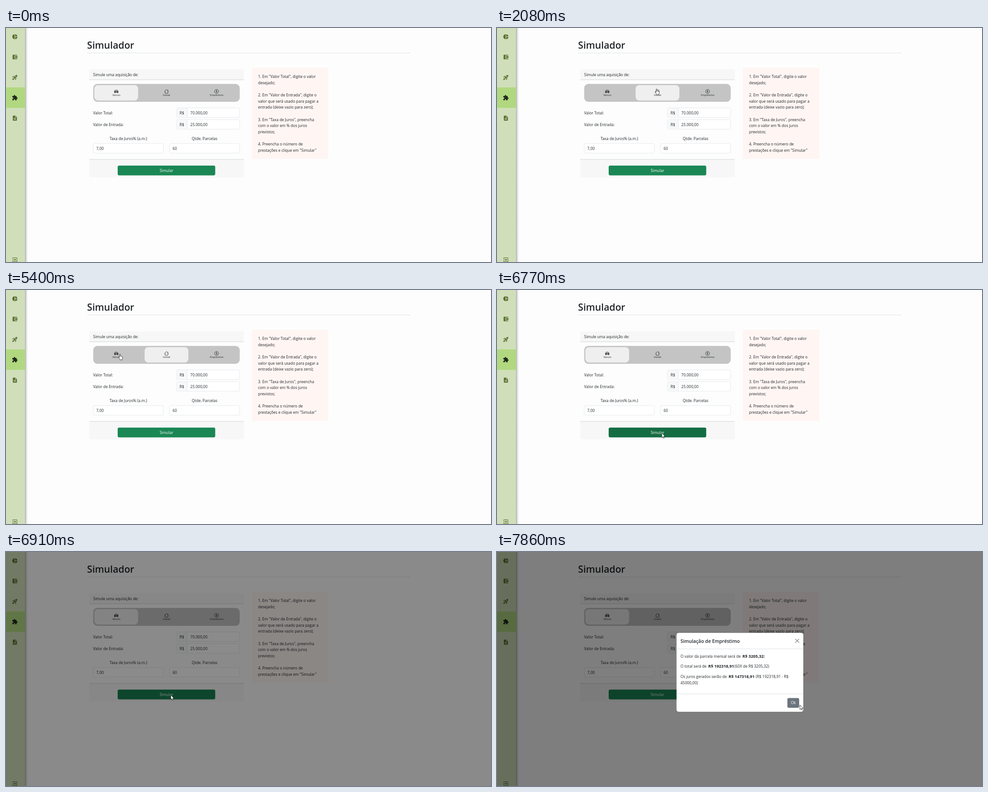
An HTML page that plays this animation: 1077x520 px, repeating every 7.99 s.

```html
<!DOCTYPE html>
<html lang="pt-BR">
<head>
<meta charset="utf-8">
<title>Simulador</title>
<style>
html, body { margin: 0; width: 100%; height: 100%; overflow: hidden; background: #fdfdfd; }
svg { display: block; }
text { font: 8.47px "Open Sans", "Noto Sans", sans-serif; fill: #212529; white-space: pre; }
.mid { text-anchor: middle; }
.small { font-size: 5.3px; }
.title { font-size: 21.2px; font-weight: 600; }
.head { font-size: 10.5px; font-weight: 600; }
.b { font-size: 9.07px; font-weight: 700; }
.light { fill: #fff; }
.line { stroke: #dee2e6; }
.field { fill: #fff; stroke: #dee2e6; stroke-width: .8; }
.menu { fill: #587031; }
.ico { fill: none; stroke: #212529; stroke-width: .8; stroke-linejoin: round; }
.cur { fill: #fff; stroke: #111; stroke-width: .8; stroke-linejoin: round; }
</style>
</head>
<body>
<svg width="1077" height="520" viewBox="0 0 1077 520">
  <defs>
    <linearGradient id="shade">
      <stop offset="0" stop-opacity=".36"/>
      <stop offset=".5" stop-opacity=".1"/>
      <stop offset="1" stop-opacity="0"/>
    </linearGradient>
  </defs>

  <!-- sidebar -->
  <rect x="42" width="7" height="520" fill="url(#shade)"/>
  <rect width="42.5" height="520" fill="#d0dfba"/>
  <rect y="132" width="42.5" height="45.5" fill="#b1d880"/>
  <g id="menu" class="menu"></g>

  <text class="title" x="180" y="46">Simulador</text>
  <path class="line" d="M180 55.5H898"/>

  <!-- form card -->
  <path fill="#f7f7f7" d="M185 92h343v23H185zM185 292h343v40H185z"/>
  <path d="M185 115h343M185 292h343" stroke="#d2d3d4"/>
  <text x="193.5" y="107">Simule uma aquisição de:</text>
  <rect x="193.7" y="124.3" width="325.3" height="39.7" rx="9" fill="#c4c4c4"/>
  <g id="pills" fill="#efefef"></g>
  <path transform="translate(240.2 136.4) scale(.58)" fill="#212529" fill-rule="evenodd" d="M2.52 3.515A2.5 2.5 0 0 1 4.82 2h6.362c1 0 1.904.596 2.298 1.515l.792 1.848c.075.175.21.319.38.404.5.25.855.715.965 1.262l.335 1.679c.033.161.049.325.049.49v.413c0 .814-.39 1.543-1 1.997V13.5a.5.5 0 0 1-.5.5h-2a.5.5 0 0 1-.5-.5v-1.338c-1.292.048-2.745.088-4 .088s-2.708-.04-4-.088V13.5a.5.5 0 0 1-.5.5h-2a.5.5 0 0 1-.5-.5v-1.892c-.61-.454-1-1.183-1-1.997v-.413a2.5 2.5 0 0 1 .049-.49l.335-1.68c.11-.546.465-1.012.964-1.261a.807.807 0 0 0 .381-.404zM3 10a1 1 0 1 0 0-2 1 1 0 0 0 0 2m10 0a1 1 0 1 0 0-2 1 1 0 0 0 0 2M6 8a1 1 0 0 0 0 2h4a1 1 0 1 0 0-2zM2.906 5.189a.51.51 0 0 0 .497.731c.91-.073 3.35-.17 4.597-.17s3.688.097 4.597.17a.51.51 0 0 0 .497-.731l-.956-1.913A.5.5 0 0 0 11.691 3H4.309a.5.5 0 0 0-.447.276z"/>
  <path class="ico" d="M351.8 141.2l4.6-4.5 4.6 4.5M353.2 140v5h6.4v-5M359.2 139.2v-2"/>
  <circle class="ico" cx="467.6" cy="141" r="4.4"/>
  <text class="mid" x="467.6" y="143.4" style="font-size:6.4px;font-weight:600">$</text>
  <text class="mid small" x="245" y="151.4">Veículo</text>
  <text class="mid small" x="356.4" y="151.4">Imóvel</text>
  <text class="mid small" x="467.8" y="151.4">Empréstimo</text>

  <text x="193.5" y="191.5">Valor Total:</text>
  <text x="193.5" y="217.6">Valor de Entrada:</text>
  <g id="money">
    <rect class="field" x="378.3" y="177.6" width="140.5" height="21.2" rx="3.2"/>
    <path d="M402.5 178H381.5a2.8 2.8 0 0 0-2.8 2.8v14.8a2.8 2.8 0 0 0 2.8 2.8h21z" fill="#f7f8f9"/>
    <path class="line" stroke-width=".8" d="M402.5 178v20.5"/>
    <text x="385.5" y="191.5">R$</text>
  </g>
  <use href="#money" y="26.1"/>
  <text x="409.3" y="191.5">70.000,00</text>
  <text x="409.3" y="217.6">25.000,00</text>
  <text class="mid" x="271.6" y="248.6">Taxa de Juros% (a.m.)</text>
  <text class="mid" x="441" y="248.6">Qtde. Parcelas</text>
  <rect class="field" x="193.8" y="256.9" width="155.6" height="21.2" rx="3.2"/>
  <rect class="field" x="363.2" y="256.9" width="155.6" height="21.2" rx="3.2"/>
  <text x="200.5" y="270.8">7,00</text>
  <text x="370" y="270.8">60</text>
  <rect id="send" x="248" y="305.8" width="216.6" height="21.6" rx="3.4"/>
  <text class="mid light" x="356.3" y="319.8">Simular</text>

  <!-- help box -->
  <rect x="546" y="88" width="170" height="202.7" fill="#fff6f4"/>
  <g id="help"></g>

  <!-- dialog -->
  <rect id="dim" width="1077" height="520"/>
  <g id="modal">
    <rect x="398.7" y="179.7" width="281.4" height="175.2" rx="4.5" fill="#fff"/>
    <path class="line" d="M399 215.3H680M399 315.3H680"/>
    <text class="head" x="407.5" y="201.8">Simulação de Empréstimo</text>
    <path d="M662.5 193.3l8 8m0-8l-8 8" stroke="#777" stroke-width="1.2" stroke-linecap="round"/>
    <text x="407.5" y="234.6">O valor da parcela mensal será de <tspan class="b" x="545">R$ 3205,32:</tspan></text>
    <text x="407.5" y="257.3">O total será de <tspan class="b" x="469">R$ 192318,91</tspan><tspan x="527">(60X de R$ 3205,32)</tspan></text>
    <text x="407.5" y="279.9">Os juros gerados serão de <tspan class="b" x="514.3">R$ 147318,91</tspan><tspan x="574.5">(R$ 192318,91 - R$</tspan></text>
    <text x="407.5" y="293.5">45000,00)</text>
    <rect x="644.8" y="324.4" width="26.2" height="21.8" rx="3.4" fill="#6c757d"/>
    <text class="mid light" x="657.9" y="338.4">Ok</text>
  </g>

  <g id="cursor" class="cur">
    <path id="arrow" d="M0 0v10l2.3-2.1 1.6 3.5 1.7-.8-1.6-3.4h3.2z"/>
    <path id="hand" d="M3 8V1.4a1 1 0 0 1 2 0V5q1-.8 1.7.3 1-.5 1.5.5 1.3-.3 1.5 1v2.4q0 1.6-.9 2.6v1.4H4.2v-1L.9 8.2q-.7-1.1.5-1.4.8 0 1.6 1.2z"/>
  </g>
</svg>
<script>
const LOOP = 7990, PILL_FADE = 180;
const $ = id => document.getElementById(id);
const add = (parent, tag, attrs, text = "") => {
  const el = document.createElementNS("http://www.w3.org/2000/svg", tag);
  for (const k in attrs) el.setAttribute(k, attrs[k]);
  el.textContent = text;
  return $(parent).appendChild(el);
};
const ramp = (t, start, length) => Math.min(1, Math.max(0, (t - start) / length));
const mix = (a, b, k) => a + (b - a) * k;

// [centre y, 24-unit path]
const icons = [
  [19.3, "M11 2v20c-5.07-.5-9-4.79-9-10s3.93-9.5 9-10zm2.03 0v8.99H22c-.47-4.74-4.24-8.52-8.97-8.99zm0 11.01V22c4.74-.47 8.5-4.25 8.97-8.99z"],
  [64.5, "M21 18v1c0 1.1-.9 2-2 2H5c-1.11 0-2-.9-2-2V5c0-1.1.89-2 2-2h14c1.1 0 2 .9 2 2v1h-9c-1.11 0-2 .9-2 2v8c0 1.1.89 2 2 2zm-9-2h10V8H12zm4-2.5c-.83 0-1.5-.67-1.5-1.5s.67-1.5 1.5-1.5 1.5.67 1.5 1.5-.67 1.5-1.5 1.5z"],
  [109.8, "M9.19 6.35c-2.04 2.29-3.44 5.58-3.57 5.89L2 10.69l4.05-4.05c.47-.47 1.15-.68 1.81-.55zM11.17 17s3.74-1.55 5.89-3.7c5.4-5.4 4.5-9.62 4.21-10.57-.95-.3-5.17-1.19-10.57 4.21C8.55 9.09 7 12.83 7 12.83zm6.48-2.19c-2.29 2.04-5.58 3.44-5.89 3.57L13.31 22l4.05-4.05c.47-.47.68-1.15.55-1.81zM9 18c0 .83-.34 1.58-.88 2.12C6.94 21.3 2 22 2 22s.7-4.94 1.88-6.12C4.42 15.34 5.17 15 6 15c1.66 0 3 1.34 3 3zm4-9c0-1.1.9-2 2-2s2 .9 2 2-.9 2-2 2-2-.9-2-2z"],
  [155, "M20.5 11H19V7c0-1.1-.9-2-2-2h-4V3.5C13 2.12 11.88 1 10.5 1S8 2.12 8 3.5V5H4c-1.1 0-2 .9-2 2v3.8h1.5c1.49 0 2.7 1.21 2.7 2.7s-1.21 2.7-2.7 2.7H2V20c0 1.1.9 2 2 2h3.8v-1.5c0-1.49 1.21-2.7 2.7-2.7s2.7 1.21 2.7 2.7V22H17c1.1 0 2-.9 2-2v-4h1.5c1.38 0 2.5-1.12 2.5-2.5S21.88 11 20.5 11z"],
  [200.3, "M14 2H6c-1.1 0-2 .9-2 2v16c0 1.1.89 2 2 2h12c1.1 0 2-.9 2-2V8zm2 16H8v-2h8zm0-4H8v-2h8zm-3-5V3.5L18.5 9z"],
  [515, "M10.09 15.59L11.5 17l5-5-5-5-1.41 1.41L12.67 11H3v2h9.67zM19 3H5c-1.11 0-2 .9-2 2v4h2V5h14v14H5v-4H3v4c0 1.1.89 2 2 2h14c1.1 0 2-.9 2-2V5c0-1.1-.9-2-2-2z"]
];
icons.forEach(([y, d], i) => {
  const el = add("menu", "path", { d, transform: `translate(12.9 ${y - 6.8}) scale(.567)` });
  if (i === 3) el.setAttribute("fill", "#20281c");
});

const help = `1. Em "Valor Total", digite o valor
desejado;

2. Em "Valor de Entrada", digite o
valor que será usado para pagar a
entrada (deixe vazio para zero);

3. Em "Taxa de Juros", preencha
com o valor em % dos juros
previstos;

4. Preencha o número de
prestações e clique em "Simular"`;
help.split("\n").forEach((s, i) => add("help", "text", { x: 559.7, y: 111.3 + 13.6 * i }, s));

const pills = [0, 1, 2].map(i =>
  add("pills", "rect", { x: 196.2 + 111.6 * i, y: 127, width: 97.2, height: 34.2, rx: 8 }));
// [time, chosen tab]
const picks = [[-999, 0], [1840, 1], [3060, 2], [4340, 1], [5410, 0]];

// pointer path: [time, x, y]
const path = [
  [110, 834, 376], [330, 640, 215], [520, 470, 90], [620, 410, 70], [740, 345, 95],
  [810, 331, 120], [880, 342, 132], [1090, 346, 136], [1960, 346, 136], [2080, 350, 135],
  [2400, 455, 143], [2540, 480, 146], [2620, 475, 144], [2760, 467, 141], [2890, 467, 141],
  [2960, 463, 138], [3440, 463, 138], [3710, 419, 137], [3990, 360, 137], [4500, 360, 137],
  [5000, 249, 136], [5130, 249, 136], [5200, 245, 135], [5330, 245, 135], [5400, 249, 142],
  [5560, 249, 142], [5800, 275, 200], [6160, 341, 286], [6430, 366, 318], [6940, 366, 318],
  [7200, 640, 300], [7390, 805, 265], [7860, 672.7, 340], [LOOP, 672.7, 340]
];

function drawCursor(t) {
  const n = Math.max(1, path.findIndex(p => p[0] > t));
  const [t0, x0, y0] = path[n - 1], [t1, x1, y1] = path[n];
  const k = ramp(t, t0, t1 - t0), x = mix(x0, x1, k), y = mix(y0, y1, k);
  const overTabs = x > 190 && x < 519 && y > 124 && y < 164;
  $("cursor").style.display = t < t0 ? "none" : "";
  $("cursor").setAttribute("transform", `translate(${x} ${y})`);
  $("hand").style.display = overTabs ? "" : "none";
  $("arrow").style.display = overTabs ? "none" : "";
}

function draw(now) {
  const t = now % LOOP;
  const n = picks.filter(p => p[0] <= t).length - 1;
  const fade = ramp(t, picks[n][0], PILL_FADE);
  pills.forEach((el, i) => {
    const before = n && picks[n - 1][1] === i ? 1 : 0;
    el.setAttribute("opacity", mix(before, picks[n][1] === i ? 1 : 0, fade));
  });

  const press = ramp(t, 6600, 150) - ramp(t, 6800, 150);
  const [r, g, b] = [[26, 20], [135, 108], [84, 67]].map(c => mix(...c, press));
  $("send").setAttribute("fill", `rgb(${r},${g},${b})`);

  $("dim").setAttribute("opacity", .5 * ramp(t, 6775, 150));
  const slide = 1 - (1 - ramp(t, 6940, 300)) ** 2;
  $("modal").setAttribute("opacity", ramp(t, 6940, 150));
  $("modal").setAttribute("transform", `translate(0 ${-28 * (1 - slide)})`);
  drawCursor(t);
}

const start = performance.now();
(function tick() {
  draw(performance.now() - start);
  requestAnimationFrame(tick);
})();
</script>
</body>
</html>
```
